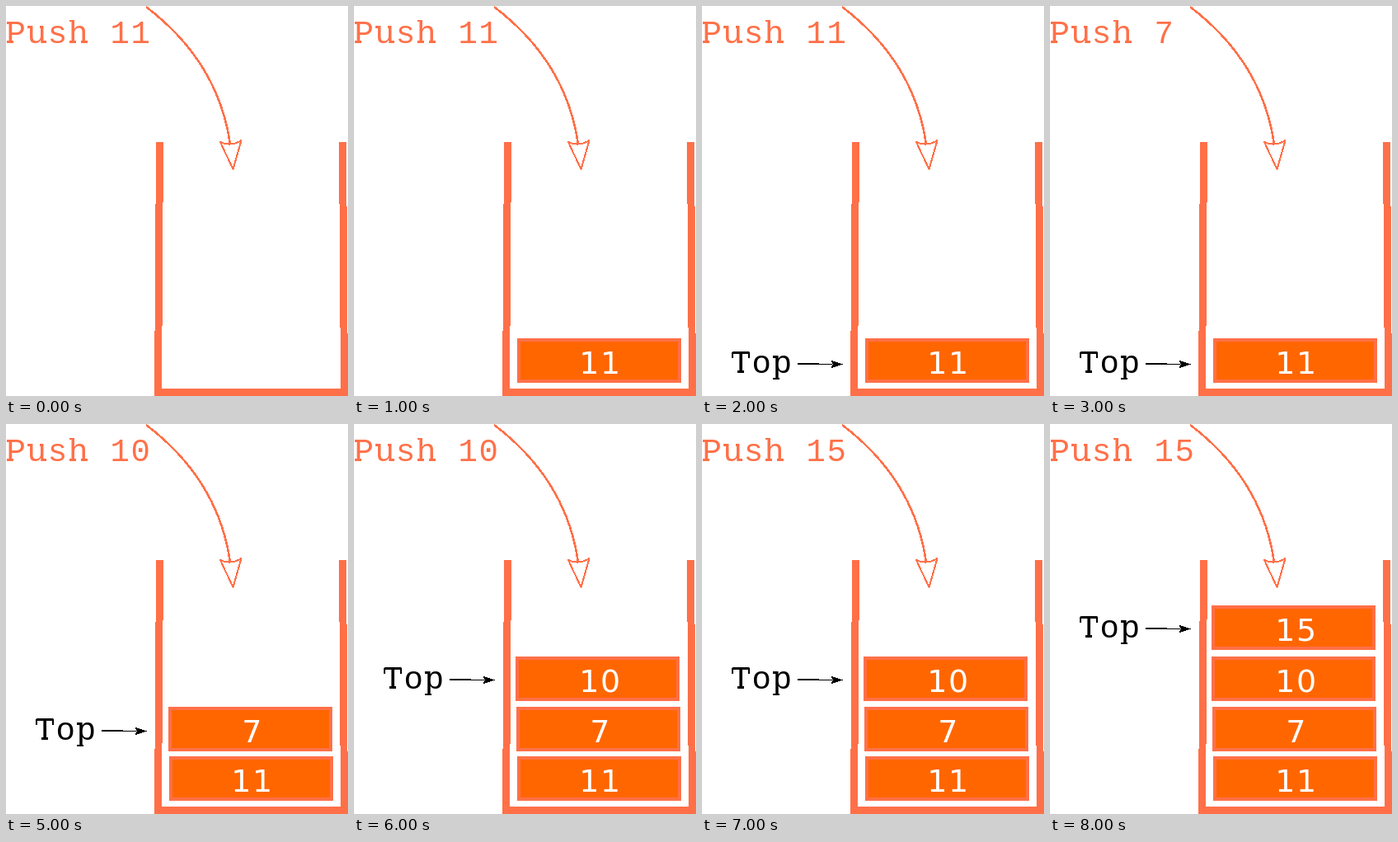
These frames come from a looping animation (415x473 px, 9000 ms). An HTML page:

```html
<!DOCTYPE html>
<html lang="en">
<head>
<meta charset="utf-8">
<title>Stack push</title>
<style>
  html, body { margin: 0; width: 100%; height: 100%; overflow: hidden; background: #fff; }
  svg { display: block; width: 415px; height: 473px; shape-rendering: crispEdges; }
  .mono { font: 39px "Liberation Mono", "Courier New", monospace; letter-spacing: 1.8px; white-space: pre; }
  .value { font: 38px "DejaVu Sans", Verdana, sans-serif; letter-spacing: 1.5px; text-anchor: middle; fill: #fff; }
  .serif { fill: none; stroke-width: 2.5; }
  .block rect { fill: #f60; stroke: #ff7048; stroke-width: 4; }
</style>
</head>
<body>
<svg viewBox="0 0 415 473">
  <g transform="translate(-.5 45)" fill="#ff7048">
    <text id="push" class="mono" x=".9"></text>
    <path id="pushSerifs" class="serif" stroke="#ff7048"/>
  </g>

  <g fill="none" stroke="#ff7048" stroke-linejoin="round">
    <path stroke-width="2.6" d="M170 1Q258 68 272 168"/>
    <path stroke-width="2" fill="#fff" d="M260 165Q273 171 285.500 163L275.500 198Z"/>
  </g>
  <path fill="#ff7048" d="M182 165H191L189 464H406L404 165H413L415 473H180Z"/>

  <g id="blocks"></g>

  <g id="top">
    <g transform="translate(34.500 0)">
      <text class="mono" x=".9">Top</text>
      <path id="topSerifs" class="serif" stroke="#000"/>
    </g>
    <path stroke="#000" stroke-width="1.6" d="M116-11L158-10.500"/>
    <path d="M171-10.500L156-15.500L158.500-10.500L156-5.500Z"/>
  </g>
</svg>
<script>
  const STEP = 1000;
  const values = [11, 7, 10, 15];
  const stepCount = 2 * values.length + 1;

  const byId = id => document.getElementById(id);
  const push = byId("push"), blocks = byId("blocks"), topMark = byId("top");

  // Slab serifs sit on the stems of each fixed-width letter cell.
  const CELL = 25.2, LEFT = 5.4, MID = 12.6, RIGHT = 19.8;
  const BASE = -1.3, XHEIGHT = -19.3, CAP = -24.4, ASCENT = -27, DESCENT = 7;
  const slab = (cell, stem, y, before = 4, after = 4) =>
    `M${cell * CELL + stem - before} ${y}h${before + after}`;
  const flag = (cell, stem, y) => slab(cell, stem, y, 4, 0);

  byId("pushSerifs").setAttribute("d",
    slab(0, LEFT, BASE) + flag(0, LEFT, CAP) +
    flag(1, LEFT, XHEIGHT) + flag(1, RIGHT, XHEIGHT) + slab(1, RIGHT, BASE, 0) +
    flag(3, LEFT, ASCENT) + slab(3, LEFT, BASE) + slab(3, RIGHT, BASE));
  byId("topSerifs").setAttribute("d",
    slab(0, MID, BASE) + `M${MID - 10}-25v7M${MID + 10}-25v7` +
    flag(2, LEFT, XHEIGHT) + slab(2, LEFT, DESCENT));

  // Gaps widen by a pixel and blocks lean left as the stack grows.
  const blockX = i => Math.max(196, 198 - i);
  const blockY = i => 403 - 60 * i - i * (i - 1) / 2;
  const labelY = i => 445 - 62 * i;

  blocks.innerHTML = values.map((value, i) =>
    `<g class="block"><rect x="${blockX(i) + 2}" y="${blockY(i) + 2}" width="195" height="50"/>
     <text class="value" x="299" y="${blockY(i) + 42.5}">${value}</text></g>`).join("");

  const show = (el, on) => el.setAttribute("visibility", on ? "visible" : "hidden");

  // The first block lands one step before its label; later ones arrive together with it.
  function draw(time) {
    const step = Math.floor(time / STEP) % stepCount;
    const count = Math.max(Math.min(step, 1), step >> 1);
    const pushed = Math.max(0, (step - 1) >> 1);
    push.textContent = "Push " + values[pushed];
    [...blocks.children].forEach((block, i) => show(block, i < count));
    show(topMark, step > 1);
    topMark.setAttribute("transform", `translate(0 ${labelY(count - 1)})`);
  }

  const start = performance.now();
  function tick() {
    draw(performance.now() - start);
    requestAnimationFrame(tick);
  }
  tick();
</script>
</body>
</html>
```
